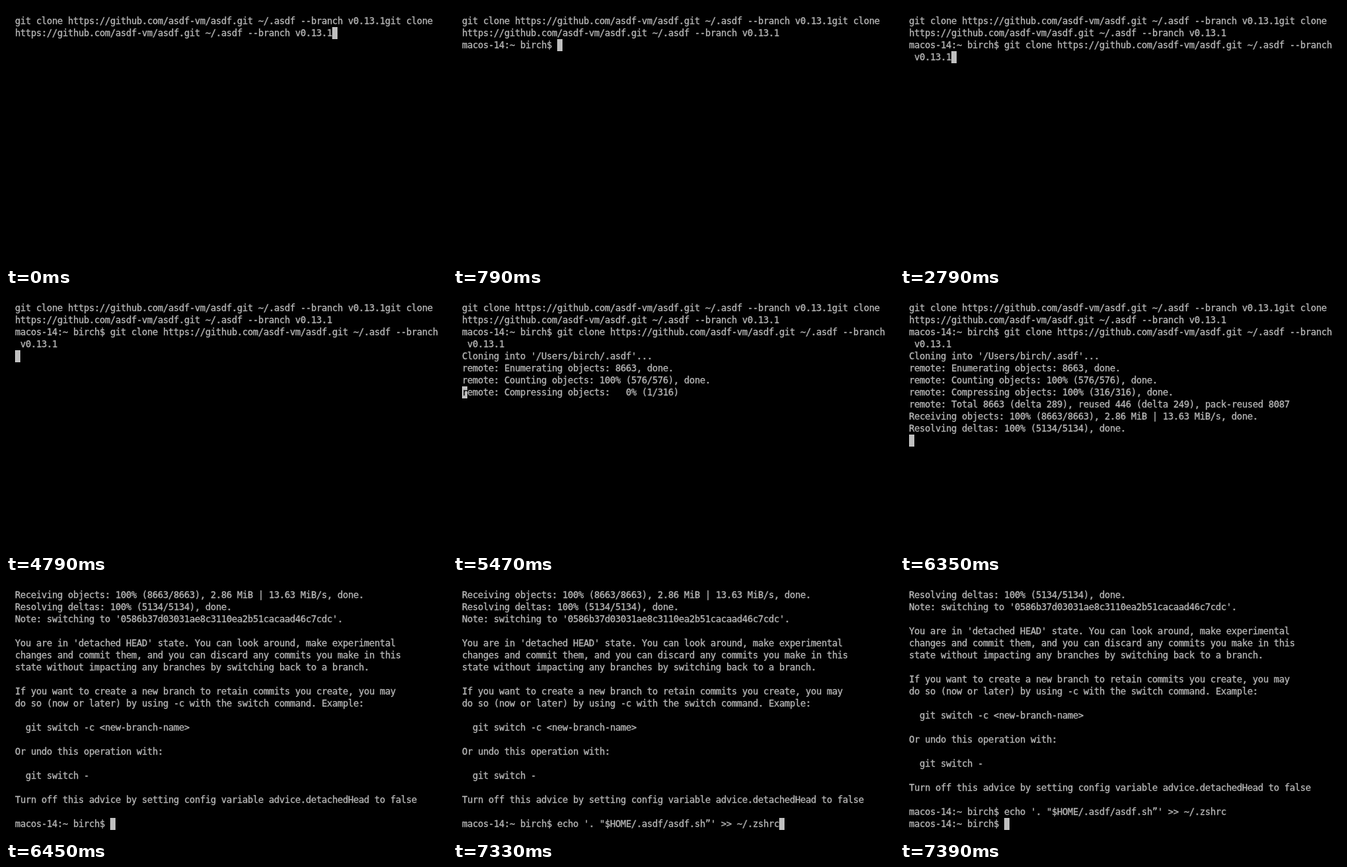
Write an HTML page that moves like this. It is 584x344 px and loops after 9.39 s.

```html
<!DOCTYPE html>
<html lang="en">
<head>
<meta charset="utf-8">
<title>Terminal</title>
<style>
  html, body { margin: 0; width: 100%; height: 100%; overflow: hidden; background: #000; }
  pre {
    position: absolute; margin: 0; white-space: pre;
    font: 12px/16px "DejaVu Sans Mono", monospace;
    letter-spacing: calc(7px - 1ch); font-variant-ligatures: none;
    -webkit-text-stroke: 0.3px;
  }
  #screen { left: 12px; top: 12px; color: #b8b8b8; }
  #cursor { width: 7px; height: 16px; background: #bfbfbf; color: #000; }
</style>
</head>
<body>
<pre id="screen"></pre>
<pre id="cursor"></pre>
<script>
const LOOP = 9390, ROWS = 20, CELL_W = 7, CELL_H = 16, PAD = 12;
const prompt = 'macos-14:~ birch$ ';
const repo = 'https://github.com/asdf-vm/asdf.git ~/.asdf --branch';

// A progress line returns the cursor to column 0, so the next text overwrites it.
const progress = (label, pct, total) =>
  `${label}: ${String(pct).padStart(3)}% (${Math.max(1, Math.ceil(pct * total / 100))}/${total})`;
const counting = pct => progress('remote: Counting objects', pct, 576);
const compressing = pct => progress('remote: Compressing objects', pct, 316);
const receiving = pct => progress('Receiving objects', pct, 8663);
const resolving = pct => progress('Resolving deltas', pct, 5134);

const advice = `Note: switching to '0586b37d03031ae8c3110ea2b51cacaad46c7cdc'.

You are in 'detached HEAD' state. You can look around, make experimental
changes and commit them, and you can discard any commits you make in this
state without impacting any branches by switching back to a branch.

If you want to create a new branch to retain commits you create, you may
do so (now or later) by using -c with the switch command. Example:

  git switch -c <new-branch-name>

Or undo this operation with:

  git switch -

Turn off this advice by setting config variable advice.detachedHead to false

`;

// [time in ms, terminal output]
const output = [
  [0, `git clone ${repo} v0.13.1git clone\n${repo} v0.13.1`],
  [790, '\n' + prompt],
  [2790, `git clone ${repo}\n v0.13.1`],
  [4790, '\n'],
  [4810, "Cloning into '/Users/birch/.asdf'...\n"],
  [5470, `remote: Enumerating objects: 8663, done.\n${counting(100)}, done.\n${compressing(0)}\r`],
  [5550, `${compressing(100)}, done.\n`],
  [5770, receiving(0) + '\r'],
  [5830, receiving(10) + '\r'],
  [5930, receiving(21) + '\r'],
  [5970, receiving(34) + '\r'],
  [6010, receiving(47) + '\r'],
  [6050, receiving(60) + '\r'],
  [6090, receiving(73) + '\r'],
  [6130, receiving(87) + '\r'],
  [6170, 'remote: Total 8663 (delta 289), reused 446 (delta 249), pack-reused 8087\n' +
         `${receiving(100)}, 2.86 MiB | 13.63 MiB/s, done.\n${resolving(0)}\r`],
  [6250, resolving(52) + '\r'],
  [6350, `${resolving(100)}, done.\n`],
  [6390, advice],
  [6450, prompt],
  [7330, `echo '. "$HOME/.asdf/asdf.sh”' >> ~/.zshrc`],
  [7390, '\n' + prompt]
];

const screen = document.getElementById('screen');
const cursor = document.getElementById('cursor');
let shown = 0;

function render(count) {
  const log = output.slice(0, count).map(([, text]) => text).join('');
  const lines = log.split('\n').map(line => line.replace(/^[^]*\r(?=.)/, '')).slice(-ROWS);
  const row = lines.length - 1, last = lines[row];
  const col = last.endsWith('\r') ? 0 : last.length;
  screen.textContent = lines.join('\n').replace(/\r/g, '');
  cursor.textContent = (last[col] || '').trim();
  cursor.style.left = PAD + col * CELL_W + 'px';
  cursor.style.top = PAD + row * CELL_H + 'px';
}

function tick() {
  const t = (performance.now() - start) % LOOP;
  const count = output.filter(([time]) => time <= t).length;
  if (count !== shown) render(shown = count);
  requestAnimationFrame(tick);
}
const start = performance.now();
tick();
</script>
</body>
</html>
```
